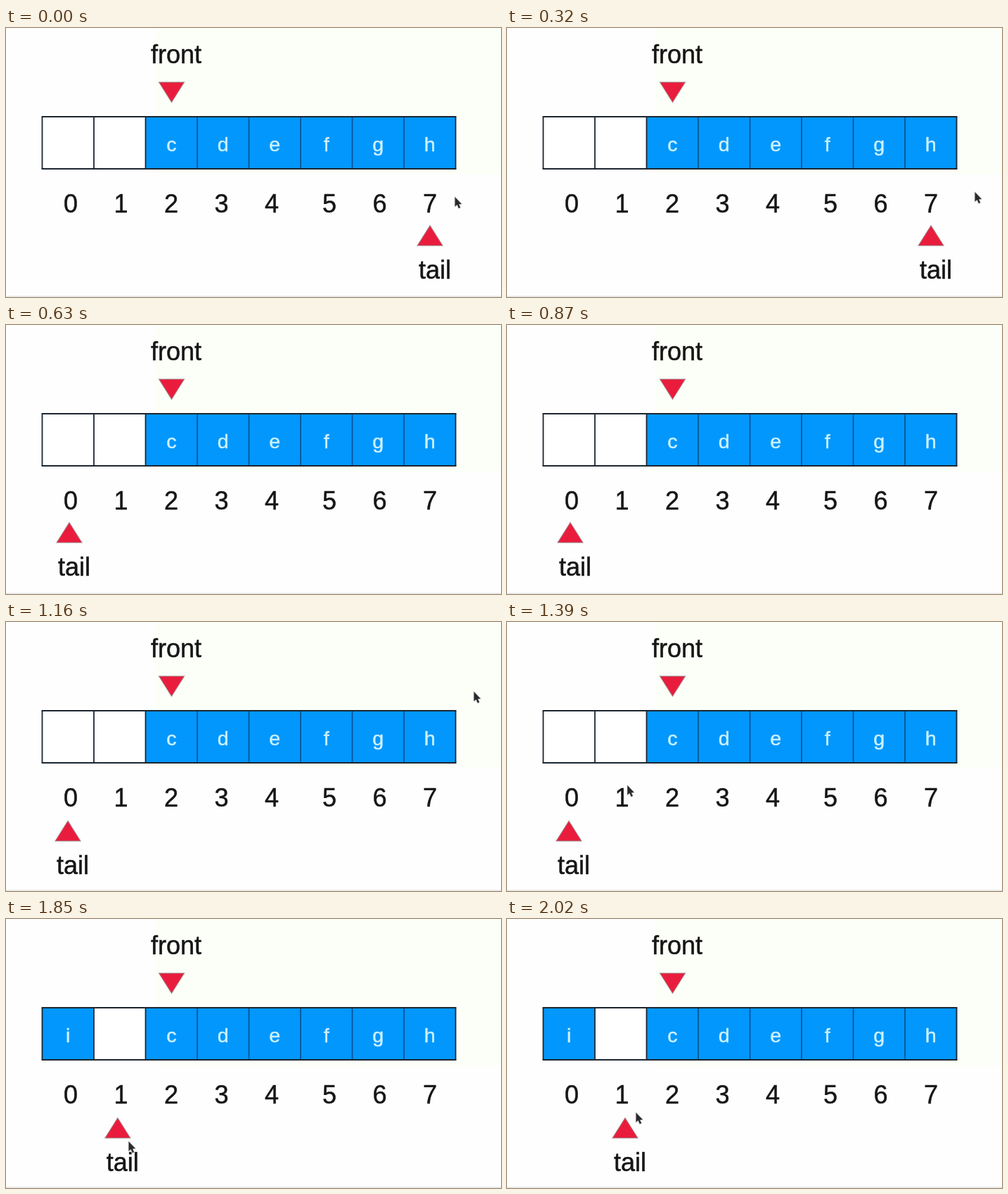
An HTML page with a canvas that plays this animation: 704 px wide and 382 px high, repeating every 2.1 s.

```html
<!DOCTYPE html>
<html lang="en">
<head>
<meta charset="utf-8">
<title>Circular queue</title>
<style>
  html, body { margin: 0; width: 100%; height: 100%; overflow: hidden; background: #fefefe; }
  canvas { display: block; }
</style>
</head>
<body>
<canvas id="stage" width="704" height="382"></canvas>
<script>
const ctx = document.getElementById('stage').getContext('2d');
const LOOP = 2100, BEATS = 27, LEAD = 20;
const FONT = '"Liberation Sans", Arial, sans-serif';
const LEFT = 51.5, TOP = 126, CELL = 73.5, BOTTOM = 200, COUNT = 8;
const RED = '#ea1c3d', BLUE = '#0297fc', INK = '#161616', PALE = '#ccf1ff', EDGE = '#1c2630';

const clamp = v => Math.min(1, Math.max(0, v));
const smooth = v => v * v * (3 - 2 * v);
const mix = (a, b, p) => a + (b - a) * p;
const part = (beat, from, to) => clamp((beat - from) / (to - from));
const between = (a, b, p) => a.map((v, i) => mix(v, b[i], p));

// Quadratic curve from a to b, pulled towards c
const bend = (a, c, b, p) => between(between(a, c, p), between(c, b, p), p);

function tailAt(beat) {
  if (beat < 13) return [mix(603, 90, smooth(part(beat, 5, 8))), 295];
  return [mix(88, 168, smooth(part(beat, 21, 24.8))), 297];
}

function cursorAt(beat) {
  const corner = [665, 99], grab = [111, 298], drop = [174, 316];
  if (beat < 6) return between([638, 240], [665, 233], part(beat, 0, 4));
  if (beat < 14) return null;
  if (beat < 21) return bend(corner, [-180, 310], grab, part(beat, 16, 21));
  if (beat < 24) return between(grab, drop, part(beat, 21, 24));
  return between(drop, [183, 275], part(beat, 24, 26));
}

function label(text, x, y, size, color) {
  ctx.font = size + 'px ' + FONT;
  ctx.textAlign = 'center';
  ctx.fillStyle = ctx.strokeStyle = color;
  ctx.lineWidth = 0.5;
  ctx.fillText(text, x, y);
  ctx.strokeText(text, x, y);
}

function line(x0, y0, x1, y1, color) {
  ctx.strokeStyle = color;
  ctx.lineWidth = 1.8;
  ctx.beginPath();
  ctx.moveTo(x0, y0);
  ctx.lineTo(x1, y1);
  ctx.stroke();
}

function polygon(points) {
  ctx.beginPath();
  points.forEach(([x, y]) => ctx.lineTo(x, y));
  ctx.closePath();
}

// dir 1 points down, -1 points up
function marker(x, y, dir) {
  polygon([[x - 18, y - 14 * dir], [x + 18, y - 14 * dir], [x, y + 14.5 * dir]]);
  ctx.fillStyle = RED;
  ctx.fill();
  ctx.strokeStyle = 'rgba(150, 125, 130, 0.65)';
  ctx.lineWidth = 1.3;
  ctx.stroke();
}

function background() {
  ctx.fillStyle = '#fefefe';
  ctx.fillRect(0, 0, 704, 382);
  ctx.fillStyle = '#fcfef8';
  ctx.fillRect(212, 0, 492, 208);
  ctx.fillStyle = '#e6e6e6';
  ctx.fillRect(0, 380.5, 704, 1.5);
}

function queue(letters) {
  const edge = i => LEFT + i * CELL;
  const full = i => /\w/.test(letters[i] || '');
  for (let i = 0; i < COUNT; i++) {
    ctx.fillStyle = full(i) ? BLUE : '#ffffff';
    ctx.fillRect(edge(i), TOP, CELL, BOTTOM - TOP);
    if (full(i)) label(letters[i], edge(i + 0.5), 174.5, 28.5, PALE);
    // Indices sit in two evenly spaced groups.
    label(i, 92 + 71.5 * i + (i > 4 ? 10.5 : 0), 261.5, 36, INK);
  }
  for (let i = 0; i <= COUNT; i++) {
    line(edge(i), TOP, edge(i), BOTTOM, full(i - 1) && full(i) ? '#07559a' : EDGE);
  }
  for (const y of [TOP, BOTTOM]) line(LEFT - 0.9, y, edge(COUNT) + 0.9, y, EDGE);
}

function pointer(x, y) {
  ctx.save();
  ctx.translate(x, y);
  polygon([[0.5, 0], [0.5, 13.5], [3.6, 11], [5.8, 16], [8.2, 15], [6, 10.3], [10, 10]]);
  ctx.lineJoin = 'round';
  ctx.strokeStyle = 'rgba(225, 225, 225, 0.9)';
  ctx.lineWidth = 2;
  ctx.stroke();
  ctx.fillStyle = '#2a2a2e';
  ctx.fill();
  ctx.restore();
}

function draw(beat) {
  background();
  label('front', 242, 50, 36, INK);
  marker(235.5, 91, 1);
  queue((beat < 19 ? ' ' : 'i') + ' cdefgh');

  const [x, y] = tailAt(beat);
  marker(x, y, -1);
  label('tail', x + 7, y + 60.5, 36, INK);

  const cursor = cursorAt(beat);
  if (cursor) pointer(...cursor);
}

function tick() {
  const now = performance.now() % LOOP;
  draw(Math.min(BEATS - 1, Math.floor((now + LEAD) * BEATS / LOOP)));
  requestAnimationFrame(tick);
}
tick();
</script>
</body>
</html>
```
